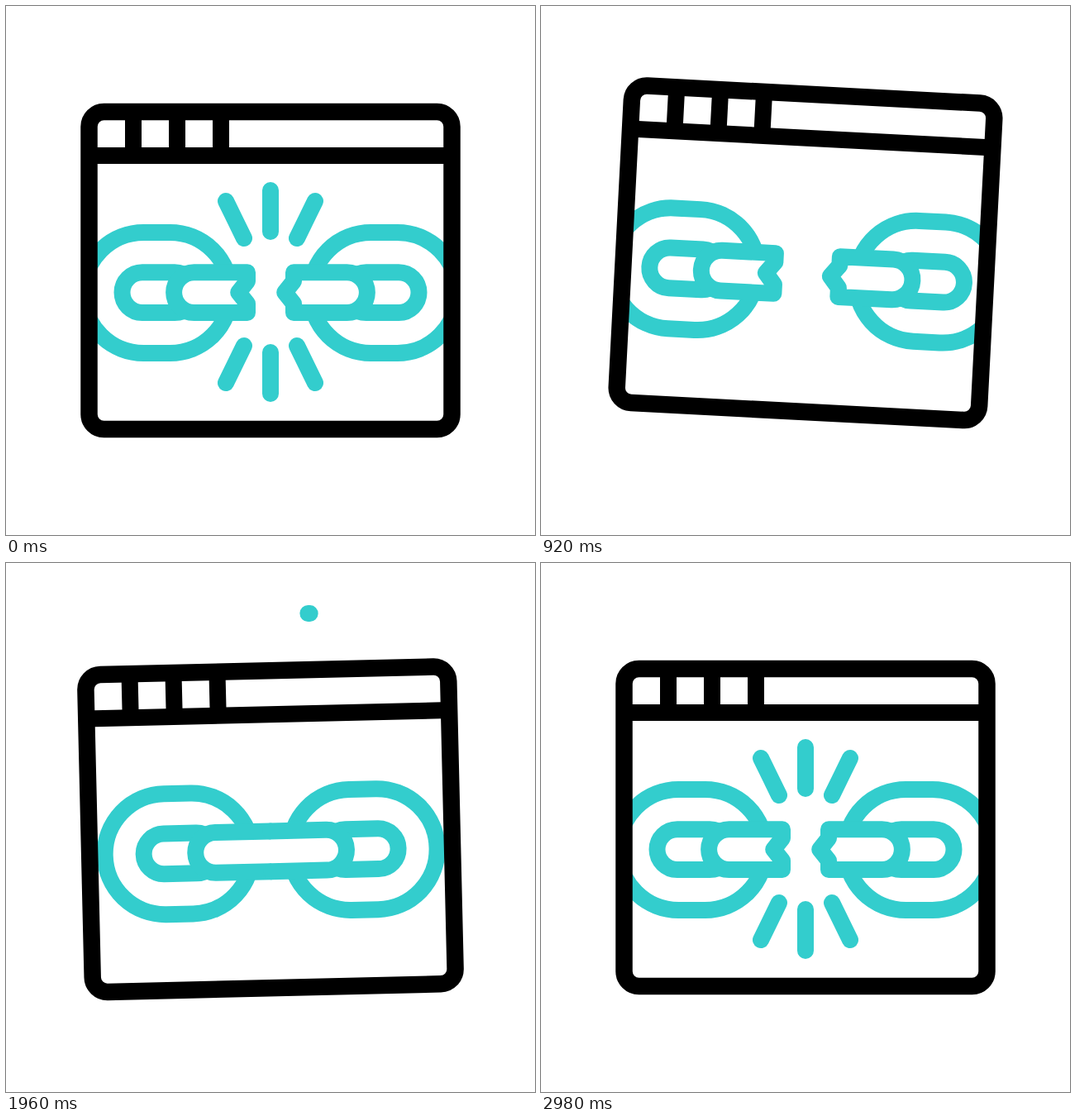
These frames come from a looping animation (640 by 640 pixels, 3060 ms). An HTML page:

```html
<!DOCTYPE html>
<html lang="en">
<head>
<meta charset="utf-8">
<title>Broken link</title>
<style>
  html, body { margin: 0; width: 100%; height: 100%; overflow: hidden; background: #fff; }
  svg { display: block; width: 100vw; height: 100vh; }
  path, rect { fill: none; stroke-width: 20; }
  .teal { stroke: #33cdcd; stroke-linecap: round; stroke-linejoin: round; }
  .black { stroke: #000; }
  .flat { stroke-linecap: butt; stroke-width: 23; }
  .bar { fill: #fff; }
</style>
</head>
<body>
<svg viewBox="0 0 640 640">
  <defs>
    <clipPath id="inside"><rect x="110" y="138" width="420" height="364"/></clipPath>
    <g id="rings" class="teal">
      <rect x="119" y="274" width="178" height="146" rx="73"/>
      <rect x="166" y="322.2" width="88" height="48.8" rx="24.4"/>
    </g>
  </defs>
  <path id="swoosh" class="teal"/>
  <g id="win">
    <g clip-path="url(#inside)">
      <g id="left"><use href="#rings"/><path class="teal bar"/></g>
      <g id="right"><use href="#rings" transform="matrix(-1 0 0 1 640 0)"/><path class="teal bar"/></g>
      <path id="sparks" class="teal"/>
    </g>
    <path class="black" d="M154 136v37m53 0v-37m53 0v37"/>
    <path id="glow" class="teal flat" d="M153.5 136v37m53 0v-37m53 0v37"/>
    <path class="black" d="M100 181H540"/>
    <rect class="black" x="100.5" y="128" width="439" height="384" rx="18" style="stroke-width:20.5"/>
  </g>
</svg>
<script>
const LOOP = 3060;
const REST = 25.5;
const $ = id => document.getElementById(id);
const smooth = t => t * t * (3 - 2 * t);
const easeOut = t => 1 - (1 - t) ** 2;

// Eased 0..1 between two times.
const ramp = (time, from, to, ease = smooth) =>
  ease(Math.min(1, Math.max(0, (time - from) / (to - from))));

const lift = t => -66.5 * ramp(t, 220, 600) + 110.5 * ramp(t, 600, 1330) - 44 * ramp(t, 1330, 2060);
const tilt = t => 3 * (ramp(t, 520, 900) - 2 * ramp(t, 900, 1600) + ramp(t, 1600, 2280));

// Half-chains pull apart to a peak, join, then snap back to rest.
const gap = (t, peak) => REST + (peak - REST) * ramp(t, 220, 650)
  - peak * ramp(t, 650, 1280) + REST * ramp(t, 2080, 2980, easeOut);

function drawLink(id, side, shift) {
  const edge = 320 + 2.5 * side;
  const end = 320 + 67 * side;
  const sweep = side < 0 ? 0 : 1;
  const open = shift > 0.5;
  const start = open ? edge : 320;
  const crack = open ? `V360L${edge - 10.8} 346.5L${edge} 333Z` : '';
  const group = $(id);
  group.lastElementChild.setAttribute('d',
    `M${start} 322.2H${end}A24.4 24.4 0 0 ${sweep} ${end} 371H${start}${crack}`);
  group.setAttribute('transform', `translate(${side * shift} 0)`);
}

// Six rays mirrored around the crack, trimmed to the span from..to.
function drawSparks(t) {
  const leaving = t < LOOP / 2;
  const from = leaving ? ramp(t, 220, 650) : 0;
  const to = leaving ? 1 : ramp(t, 2270, 2900);
  let d = '';
  for (const col of [-1, 0, 1]) {
    for (const row of [-1, 1]) {
      const point = k => {
        const reach = col ? 65 + 45 * k : 73 + 50 * k;
        return `${320 + col * (32 + 22 * k)} ${346 + row * reach}`;
      };
      if (to > from) d += `M${point(from)}L${point(to)}`;
    }
  }
  $('sparks').setAttribute('d', d);
}

function drawSwoosh(t) {
  const head = 89 * ramp(t, 1400, 1760);
  const tail = 89 * ramp(t, 1560, 1980);
  const point = deg => {
    const a = deg * Math.PI / 180;
    return `${361 + 250 * Math.cos(a)} ${311 - 250 * Math.sin(a)}`;
  };
  $('swoosh').setAttribute('d', head > tail ? `M${point(tail)}A250 250 0 0 0 ${point(head)}` : '');
}

function draw(t) {
  $('win').setAttribute('transform', `translate(0 ${lift(t)}) rotate(${tilt(t)} 320 320)`);
  drawLink('left', -1, gap(t, 55.5));
  drawLink('right', 1, gap(t, 65.5));
  drawSparks(t);
  drawSwoosh(t);
  $('glow').style.opacity = ramp(t, 1040, 1200) - ramp(t, 1420, 1600);
}

const begin = performance.now();
function tick() {
  draw((performance.now() - begin) % LOOP);
  requestAnimationFrame(tick);
}
tick();
</script>
</body>
</html>
```
